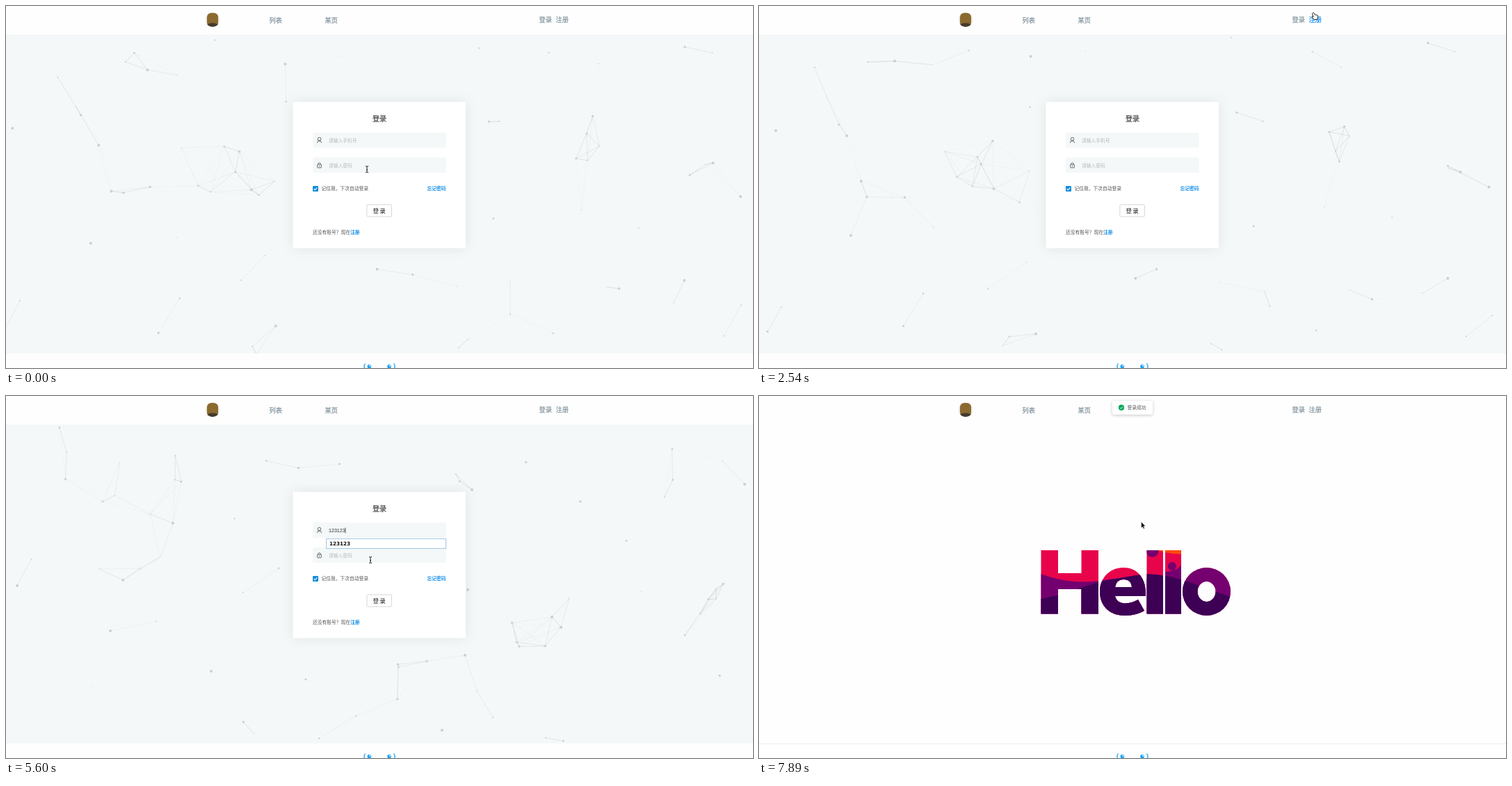
Animation of 1074x521 px, one loop 8000 ms. Source, as an HTML page with a canvas:

```html
<!DOCTYPE html>
<html lang="zh-CN">
<head>
<meta charset="utf-8">
<title>登录</title>
<style>
  html, body { margin: 0; width: 100%; height: 100%; overflow: hidden; background: #fefefe; }
  canvas, svg { position: absolute; left: 0; top: 0; }
  canvas { top: 41px; background: #f4f8f9; }
  text { font: 6.75px "Noto Sans CJK SC", "Noto Sans CJK", sans-serif; fill: #555; }
  .nav text { font-size: 9.2px; fill: #8496a0; stroke: #8496a0; stroke-width: .25; }
  .nav .hot { fill: #1890ff; stroke: #1890ff; }
  .title { font-size: 10px; fill: #444; stroke: #444; stroke-width: .25; }
  .hint { fill: #b5babd; }
  .link { font-weight: 700; fill: #1890e8; }
  .btn { font-size: 8px; fill: #3c3c3c; stroke: #3c3c3c; stroke-width: .2; }
  .typed { font: 7.1px "Liberation Sans", sans-serif; fill: #333; }
  #pass { font-size: 8px; letter-spacing: .67px; }
  .card { fill: #fff; filter: drop-shadow(0 0 9px rgba(0, 0, 0, .08)); }
  .field { fill: #f4f8f9; }
  .line { fill: none; stroke: #555; stroke-width: .9; }
  .frame { fill: #fff; stroke: #ccc; stroke-width: .8; }
  .hot .frame { stroke: #1880cc; stroke-width: 1; }
  .hot .btn { fill: #1880cc; stroke: #1880cc; }
</style>
</head>
<body>
<canvas id="net" width="1074" height="459"></canvas>
<svg width="1074" height="521" viewBox="0 0 1074 521">
  <defs>
    <clipPath id="word">
      <path d="M405.500 222H430V255H463.500V222H488V313.500H463.500V278H430V313.500H405.500Z"/>
      <path clip-rule="evenodd" d="M556 288C557 262 544 247 524 247C504 247 490 262 490 281.500C490 303 505 316 526 316C538 316 547 313 554 309L545 293C533 300 515 302 512 288ZM512 275Q514 264 524 264Q535 264 536 275Z"/>
      <path d="M557.500 222H581V313.500H557.500ZM584 222H607V313.500H584Z"/>
      <path clip-rule="evenodd" d="M609 281.500a34.500 34.500 0 0 1 69 0a34.500 34.500 0 0 1 -69 0ZM630.500 281.500a13 14.500 0 0 0 26 0a13 14.500 0 0 0 -26 0Z"/>
    </clipPath>
    <clipPath id="round"><circle cx="297" cy="19.500" r="10.500"/></clipPath>
  </defs>

  <g class="nav">
    <g clip-path="url(#round)">
      <rect x="286" y="8" width="22" height="23" fill="#eceae7"/>
      <rect x="289" y="10" width="16" height="20" rx="6" fill="#8b6a30"/>
      <ellipse cx="297" cy="29" rx="9" ry="4.500" fill="#453a2d"/>
    </g>
    <text x="378.500" y="23.500">列表</text>
    <text x="458.500" y="23.500">某页</text>
    <text id="navIn" x="766.500" y="23">登录</text>
    <text id="navUp" x="790.500" y="23">注册</text>
  </g>

  <g id="login">
    <rect class="card" x="412.500" y="138" width="248.500" height="210.500" rx="2"/>
    <text class="title" x="527" y="166">登录</text>
    <rect class="field" x="441" y="182" width="191.500" height="22" rx="2"/>
    <rect class="field" x="441" y="218" width="191.500" height="22" rx="2"/>
    <g class="line">
      <circle cx="450.500" cy="191.500" r="2.300"/>
      <path d="M447.300 197q.4-3 3.200-3t3.200 3"/>
      <rect x="447.700" y="228" width="5.600" height="4.800" rx=".8"/>
      <path d="M448.700 228v-1.200q1.800-2.600 3.600 0v1.200M450.500 229.700v1.400"/>
    </g>
    <text class="hint" id="userHint" x="464" y="195.500">请输入手机号</text>
    <text class="hint" id="passHint" x="464" y="231.700">请输入密码</text>
    <text class="typed" id="user" x="464" y="195.700"></text>
    <text class="typed" id="pass" x="464" y="232.400"></text>
    <path id="caret" d="M488 189.500v8" stroke="#222" stroke-width=".7"/>
    <g id="drop">
      <rect x="460.500" y="205.500" width="172" height="14" fill="#fff" stroke="#a3c7e2"/>
      <text x="465" y="215.300" style="font:700 7.2px 'DejaVu Sans',sans-serif;fill:#111">123123</text>
    </g>
    <rect x="441" y="259" width="8" height="8" rx="1" fill="#128bdc"/>
    <path d="M442.700 263l1.700 1.800 3-3.400" fill="none" stroke="#fff" stroke-width="1.100"/>
    <text x="453.500" y="265.200">记住我，下次自动登录</text>
    <text class="link" x="605.500" y="265.200">忘记密码</text>
    <g id="submit">
      <rect class="frame" x="518.900" y="285.900" width="35.500" height="17.300" rx="1.500"/>
      <text class="btn" x="527.700" y="297.500">登 录</text>
    </g>
    <text x="441" y="328.200">还没有账号？现在</text>
    <text class="link" id="toReg" x="495" y="328.200">注册</text>
  </g>

  <g id="register">
    <rect class="card" x="412.500" y="138" width="248.500" height="183.500" rx="2"/>
    <text class="title" x="527" y="166">注册</text>
    <rect class="field" x="441" y="182" width="191.500" height="22" rx="2"/>
    <rect class="field" x="441" y="218" width="152.500" height="22" rx="2"/>
    <rect class="field" x="441" y="254" width="191.500" height="22" rx="2"/>
    <text class="hint" x="445" y="195.500">请输入手机号</text>
    <text class="hint" x="445" y="231.700">请输入验证码</text>
    <text class="hint" x="445" y="267.700">请输入密码</text>
    <path class="line" d="M601 234.500l-.4-3.200a6.300 6.300 0 1 1 3 3z"/>
    <path d="M602.500 228.500h1.500m1.700 0h1.500m1.700 0h1.500" stroke="#555" stroke-width="1.400"/>
    <path class="line" d="M628.600 222.700q1.500.6 2.700 1.900q.4 4-2.600 6.700t-7 3l-1.600-2.200 2.700-2.400 1.700 1q2.500-1.300 3.600-3.800l-1.300-1.700z"/>
    <rect class="frame" x="518.900" y="290.200" width="35.500" height="17.300" rx="1.500"/>
    <text class="btn" x="527.700" y="301.800">创 建</text>
  </g>

  <g id="home">
    <path d="M0 500.500H1074" stroke="#f0f0f0"/>
    <g clip-path="url(#word)" role="img" aria-label="Hello">
      <rect x="400" y="215" width="290" height="105" fill="#e8044b"/>
      <g id="waves">
        <path d="M570 200H612V227.500Q597 228 584 225T570 222Z" fill="#fb4a0c"/>
        <g fill="#74006f">
          <path d="M400 254Q445 272 488 266T530 262H578L584 253Q603 251 606 244L612 222 690 212V400H400Z"/>
          <circle cx="565.500" cy="223" r="9"/>
          <circle cx="594" cy="245" r="6"/>
        </g>
        <path d="M400 293Q430 288 463 276T557 256Q590 257 625 270T690 293V400H400Z" fill="#3d0055"/>
      </g>
    </g>
    <g id="toast">
      <rect x="508" y="7" width="58" height="19.700" rx="2" fill="#fff" style="filter:drop-shadow(0 1px 2px rgba(0,0,0,.22))"/>
      <circle cx="521" cy="16.700" r="4.100" fill="#00a854"/>
      <path d="M519 16.700l1.500 1.600 2.600-3" fill="none" stroke="#fff"/>
      <text x="529.500" y="19.200">登录成功</text>
    </g>
  </g>

  <g fill="none" stroke="#1ba0f5" stroke-width="1.300">
    <path d="M516.500 514.500q-3 4.500 0 9M557.500 514.500q3 4.500 0 9"/>
    <g fill="#1ba0f5" stroke="none">
      <circle cx="522.300" cy="518.800" r="2.800"/><circle cx="551" cy="518.800" r="2.800"/>
    </g>
    <g fill="#fff" stroke="none">
      <circle cx="523.300" cy="517.800" r="1"/><circle cx="552" cy="517.800" r="1"/>
    </g>
  </g>

  <g id="cursor">
    <path id="beam" d="M-2-4.500q2 0 2 1v7q0 1-2 1M2-4.500q-2 0-2 1M0 3.500q0 1 2 1M-1 .8h2" fill="none" stroke="#222"/>
    <path id="hand" d="M-2.700-4.500q1-1 1.800.3l1 2.200 3.800.8q1 .3.800 1.600l-.6 3.200-.8 1.400h-4.200l-3.200-3.400q-.6-1 .8-1.100l1.400.8-1.600-4.200q-.2-.9.8-1.600z" fill="#fff" stroke="#222"/>
    <path id="arrow" d="M-.5-5v9l2-1.800 1.400 3 1.500-.7-1.300-2.900h2.700z" fill="#111" stroke="#fff" stroke-width=".5"/>
  </g>
</svg>
<script>
const PERIOD = 8000, WIDTH = 1074, HEIGHT = 459, TOP = 41;
const REGISTER = 2810, RETURN = 4100, HOME = 7260, END = 7890;
const $ = id => document.getElementById(id);
const ctx = $('net').getContext('2d');
const show = (id, on) => { $(id).style.display = on ? '' : 'none'; };
const within = (t, a, b) => t >= a && t < b;

function random(seed) {
  return () => (seed = seed * 16807 % 2147483647) / 2147483647;
}

// A few large nodes are placed at time `at`; the rest are scattered.
function swarm(seed, at, anchors) {
  const rnd = random(seed);
  const nodes = Array.from({ length: 72 }, (_, i) => {
    const [x, y] = anchors[i] || [rnd() * WIDTH, TOP + rnd() * HEIGHT];
    const angle = rnd() * 2 * Math.PI;
    return {
      x, y: y - TOP, r: anchors[i] ? 2 : .5 + 1.3 * rnd(),
      vx: .006 * Math.cos(angle), vy: .006 * Math.sin(angle)
    };
  });
  return t => nodes.map(n => ({ ...n, x: n.x + n.vx * (t - at), y: n.y + n.vy * (t - at) }));
}

const firstNet = swarm(4711, 800, [[14, 177], [131, 196], [201, 88], [150, 262], [125, 338], [348, 264],
  [398, 80], [391, 464], [536, 383], [1014, 230], [1054, 270], [980, 394]]);
const registerNet = swarm(1213, 3590, [[413, 55], [150, 202], [52, 224], [213, 296], [210, 334], [437, 98],
  [738, 170], [819, 120], [282, 409], [748, 415], [960, 275], [1000, 405]]);
const returnNet = swarm(9091, 5600, [[16, 273], [168, 265], [150, 338], [240, 183], [295, 396], [670, 135],
  [664, 279], [785, 318], [798, 333], [1062, 127], [660, 373], [627, 481]]);

function drawNet(nodes) {
  const reach = 82;
  ctx.clearRect(0, 0, WIDTH, HEIGHT);
  ctx.lineWidth = .6;
  ctx.strokeStyle = '#9da3a5';
  ctx.fillStyle = '#cbd0d1';
  nodes.forEach((p, i) => {
    for (const q of nodes.slice(i + 1)) {
      const d = Math.hypot(p.x - q.x, p.y - q.y);
      if (d > reach) continue;
      ctx.globalAlpha = .6 * (1 - d / reach);
      ctx.beginPath();
      ctx.moveTo(p.x, p.y);
      ctx.lineTo(q.x, q.y);
      ctx.stroke();
    }
  });
  ctx.globalAlpha = 1;
  for (const p of nodes) {
    ctx.beginPath();
    ctx.arc(p.x, p.y, p.r, 0, 7);
    ctx.fill();
  }
}

// Pointer stops: time, x, y, shape
const stops = [
  [0, 519, 235, 'beam'], [640, 519, 240, 'arrow'], [1360, 500, 332, 'hand'], [1590, 500, 332, 'hand'],
  [1830, 560, 260, 'arrow'], [2300, 799, 12, 'hand'], [3080, 799, 20, 'hand'], [3590, 763, 34, 'hand'],
  [3860, 766, 28, 'arrow'], [4330, 503, 195, 'beam'], [5130, 503, 195, 'beam'], [5600, 524, 236, 'beam'],
  [6550, 524, 236, 'arrow'], [7020, 537, 295, 'hand'], [HOME, 537, 295, 'arrow'], [END, 550, 186, 'arrow'],
  [PERIOD, 550, 186, 'arrow']];

function movePointer(t) {
  const i = stops.findIndex(s => s[0] > t) - 1;
  const [t0, x0, y0, shape] = stops[i], [t1, x1, y1] = stops[i + 1];
  const f = (t - t0) / (t1 - t0);
  $('cursor').setAttribute('transform', `translate(${x0 + (x1 - x0) * f} ${y0 + (y1 - y0) * f})`);
  for (const s of ['beam', 'hand', 'arrow']) show(s, s === shape);
}

const typedCount = (t, from, to) => Math.max(0, Math.min(6, Math.round(6 * (t - from) / (to - from))));

function draw(t) {
  const home = t >= HOME, register = within(t, REGISTER, RETURN);
  show('home', home);
  show('net', !home);
  show('register', register);
  show('login', !home && !register);
  if (!home) drawNet((t < REGISTER ? firstNet : register ? registerNet : returnNet)(t));

  $('navIn').classList.toggle('hot', within(t, 3350, RETURN));
  $('navUp').classList.toggle('hot', within(t, 2300, 3350));
  $('submit').classList.toggle('hot', t >= 7020);
  $('toReg').style.fill = within(t, 1360, 1830) ? '#4ab0f5' : '';

  const digits = typedCount(t, 4700, 5360), dots = typedCount(t, 5950, 6550);
  $('user').textContent = '123123'.slice(0, digits);
  $('pass').textContent = '•'.repeat(dots);
  show('userHint', !digits);
  show('passHint', !dots);
  show('caret', within(t, 5360, 5840));
  show('drop', within(t, 4860, 5840));

  show('toast', t >= 7500);
  $('waves').setAttribute('transform', `translate(0 ${14 * Math.max(0, END - t) / (END - HOME)})`);
  movePointer(t);
}

function loop() {
  draw(performance.now() % PERIOD);
  requestAnimationFrame(loop);
}
loop();
</script>
</body>
</html>
```
